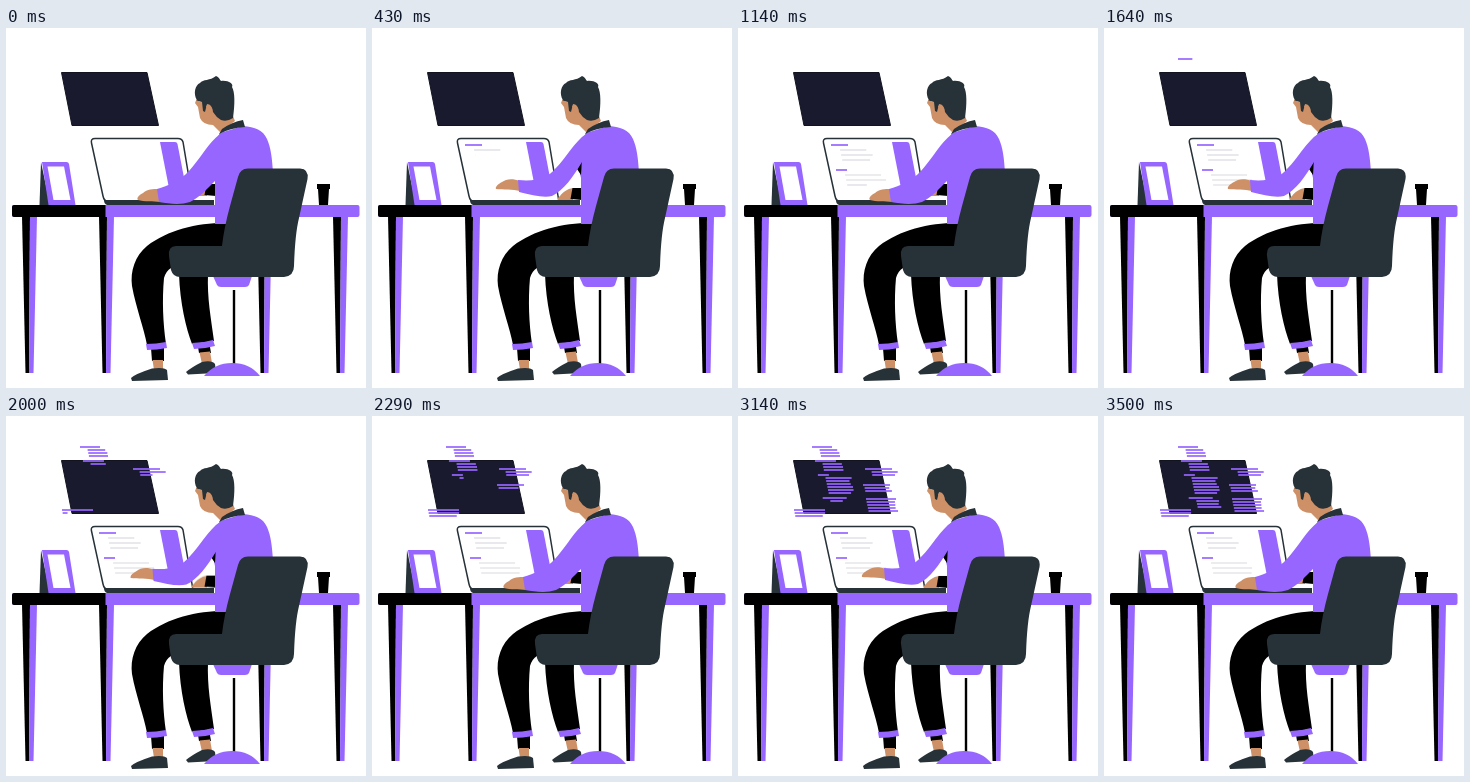
Write an HTML page that moves like this. It is 360x360 px and loops after 3.57 s.

```html
<!DOCTYPE html>
<html lang="en">
<head>
<meta charset="utf-8">
<title>Working at a desk</title>
<style>
  :root { --purple: #9766ff; --dark: #263238; --skin: #cd9067; }
  html, body { margin: 0; width: 100%; height: 100%; overflow: hidden; background: #fff; }
  svg { display: block; width: 100vw; height: 100vh; }
  .p { fill: var(--purple); }
  .d { fill: var(--dark); }
  .s { fill: var(--skin); }
  .w { fill: #fff; }
  #text line { stroke: var(--purple); stroke-width: 1.7; stroke-dasharray: 1 2; stroke-dashoffset: 1; }
  #text .gray { stroke: #e6e6ea; }

  /* Near arm: both parts share one typing motion between two poses. */
  #sleeve {
    --rest: path("M214 106C203 114 194 131 183 143C174 153 162 158 151 161L153 174C164 176 175 177 184 174C194 169 201 161 210 152L232 120Z");
    --reach: path("M214 106C203 113 194 130 183 141C176 149 166 154 146 152L147 164C160 167 171 170 180 168C192 162 201 149 210 134L232 120Z");
  }
  #hand {
    --rest: path("M153 161C147 161 141 161 137 165C133 167 130 170 132 172C138 174 147 173 154 174Z");
    --reach: path("M148 153C140 150 134 151 130 154C126 156 123 159 124 161C131 162 141 161 148 163Z");
  }
  #sleeve, #hand { d: var(--rest); animation: type 1190ms ease-in-out infinite; }
  #far { animation: far 1190ms ease-in-out infinite; }

  @keyframes type {
    0%, 4%, 91%, 100% { d: var(--rest); }
    33%, 62% { d: var(--reach); }
  }
  @keyframes far {
    0%, 4%, 91%, 100% { transform: translateY(-4px); }
    33%, 62% { transform: none; }
  }
</style>
</head>
<body>
<svg viewBox="0 0 360 360">
  <defs>
    <g id="leg">
      <path d="M0 188H8L7 345H3.500Z"/>
      <path class="p" d="M8 188H15L11.500 345H7Z"/>
    </g>
  </defs>

  <!-- monitor -->
  <path fill="#1a1a2e" stroke="#11131f" stroke-linejoin="round" d="M55.500 44.500H141L152.500 97.500H66Z"/>

  <!-- desk -->
  <use href="#leg" x="16"/>
  <use href="#leg" x="93"/>
  <use href="#leg" x="251"/>
  <use href="#leg" x="327"/>
  <rect x="6" y="177" width="347.500" height="12" rx="2" class="p"/>
  <path d="M8 177H99.500V189H8Q6 189 6 187V179Q6 177 8 177Z"/>

  <!-- picture frame -->
  <path class="d" d="M35 134L44 177H33.500Z"/>
  <path class="p" d="M36 134H60.500Q62.500 134 63 136L69.500 177H42.500Z"/>
  <path class="w" d="M41.500 138.500H58L64.500 172H47.500Z"/>

  <!-- cup -->
  <path d="M311 156H324V161H323L322 177H313L312 161H311Z"/>

  <!-- laptop -->
  <path class="w" stroke="#263238" stroke-width="1.500" d="M89 110.500H172Q176 110.500 177 114L187 174H102Q98 173 97 168L85.500 115Q84.500 110.500 89 110.500Z"/>
  <path class="p" d="M154 114H169Q171 114 171.500 116L180 160H163Z"/>
  <path class="d" d="M98 172H208V177H101Q98 176 98 172Z"/>

  <g id="text"></g>

  <!-- legs -->
  <path d="M219 195C190 195 162 202 141 218C129 228 124 243 126 258C130 280 138 300 141 317L160 316C157 295 156 272 158 250Q160 243 165 240L225 225V195Z"/>
  <path d="M173 246C174 275 180 300 186 316L208 313C205 290 201 270 202 246Z"/>
  <path d="M145 320H158V333H146ZM192 319H204L205 325H193Z"/>
  <path class="s" d="M146.500 332H157V342H148ZM193.500 324.500L204 323.500L206 335L196 336Z"/>
  <path class="p" d="M140 316Q150 316 160 314L161 320Q151 322 141 322ZM186 315Q197 315 207 312L209 318Q198 321 188 321Z"/>
  <path class="d" d="M125 350Q129 346 146 340.500Q158 339 161 342L162 352L126 353Z"/>
  <path class="d" d="M180 344Q186 339 196 334Q206 332 209 336L210 345L182 346.500Z"/>

  <!-- far arm -->
  <g id="far">
    <path class="s" d="M201 160C195 161 191 164 188 168Q185 170 186 172H201Z"/>
    <path d="M210 160H200.500L198.500 171L210 172Z"/>
  </g>

  <!-- head -->
  <path class="s" d="M191 70L189 75L192 79L194 90Q197 97 207 97L214 104L229 93L222 76L205 68Z"/>
  <path class="d" d="M191 72C187 66 189 57 194 55C197 51 204 53 210 48C213 49 214 52 215 53C222 52 228 56 226 59C229 64 229 76 227 90Q221 94 215 92Q210 89 207 84Q206 76 201 76L199 84L197 83L196 74Z"/>
  <path class="s" d="M200 78Q204 75 206 81Q207 86 203 86Z"/>
  <path class="d" d="M190 73L195 71V73Z"/>

  <!-- torso -->
  <path class="p" d="M214 105L237 98C249 99 257 102 261 111C265 120 266 130 267 144L250 196H209V150L203 124Z"/>
  <path d="M210 130L205 141L209 147Z"/>
  <path class="d" d="M213 106L216 101Q226 94 237 92L239 99Q224 100 213 106Z"/>
  <path id="hand" class="s"/>
  <path id="sleeve" class="p"/>

  <!-- chair -->
  <path class="p" d="M207 248H246L243 257Q242 259 239 259H215Q212 259 211 257Z"/>
  <rect x="226.800" y="262" width="2.400" height="74"/>
  <path class="p" d="M198 348Q209 335 226 335Q244 335 254 348Z"/>
  <path class="d" d="M232 149Q234 140.500 242 140.500H294Q303 141 301.500 151L293 190Q289 206 288 238Q288 248 278 249H174Q167 249 165 242L163 228Q162 218 170 218H216Q218 200 224 178Z"/>
</svg>
<script>
  const LOOP = 3570;
  const SLANT = 0.21; // lean of both screens
  const text = document.getElementById('text');

  let seed = 7;
  const rand = () => (seed = seed * 16807 % 2147483647) / 2147483647;

  function addLine(x, y, width, start, span, kind) {
    const line = document.createElementNS('http://www.w3.org/2000/svg', 'line');
    const attrs = { x1: x, x2: x + width, y1: y, y2: y, pathLength: 1, class: kind };
    for (const key in attrs) line.setAttribute(key, attrs[key]);
    text.append(line);
    line.animate([
      { strokeDashoffset: 1 },
      { strokeDashoffset: 1, offset: start / LOOP },
      { strokeDashoffset: 0, offset: (start + span) / LOOP },
      { strokeDashoffset: 0 }
    ], { duration: LOOP, iterations: Infinity });
  }

  // Types a heading and its indented rows in turn; returns the end time.
  function block({ x, y, rows, width, head = width, indent = 7, step = 3, kind = '' }, start, span) {
    addLine(x, y, head, start, span, '');
    for (let i = 1; i <= rows; i++) {
      const dy = i * step;
      addLine(x + indent + SLANT * dy, y + dy, width * (0.82 + 0.18 * rand()), start + i * span, span, kind);
    }
    return start + (rows + 1) * span;
  }

  // Laptop
  const page = { rows: 3, indent: 8, step: 5, kind: 'gray' };
  let t = block({ ...page, x: 93, y: 117, head: 17, width: 32 }, 172, 129);
  block({ ...page, x: 98, y: 142, head: 11, width: 42 }, t, 129);

  // Monitor, middle column
  const middle = y => ({ x: 74 + SLANT * (y - 31), y });
  t = block({ ...middle(31), rows: 3, width: 20 }, 1590, 71);
  t = block({ ...middle(45), rows: 3, width: 21 }, t, 71);
  t = block({ ...middle(59), rows: 6, head: 11, width: 27 }, t, 115);
  block({ ...middle(82), rows: 3, width: 24 }, t, 115);

  // Monitor, right column
  t = block({ x: 127, y: 53, rows: 2, width: 27, indent: 6 }, 1676, 128);
  t = block({ x: 125, y: 69, rows: 2, width: 27, indent: 1 }, t, 128);
  block({ x: 128, y: 83, rows: 4, width: 30, indent: 0 }, t, 128);

  // Monitor, left column
  block({ x: 56, y: 94, rows: 2, width: 31, indent: 0 }, 1850, 130);
</script>
</body>
</html>
```
